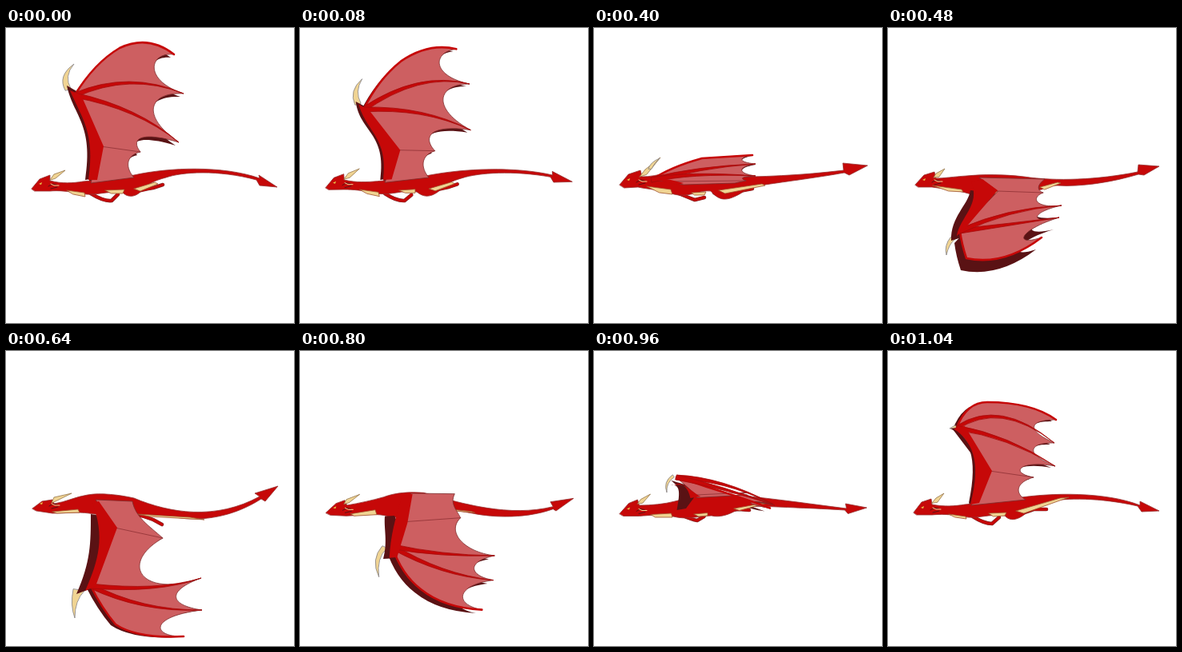
Animation of 360 by 369 pixels, one loop 1.12 s. Source, as an HTML page with a canvas:

```html
<!DOCTYPE html>
<html lang="en">
<head>
<meta charset="utf-8">
<title>Flying dragon</title>
<style>
html, body { margin: 0; width: 100%; height: 100%; overflow: hidden; background: #fff; }
canvas { display: block; width: 360px; height: 369px; }
</style>
</head>
<body>
<canvas id="stage" width="360" height="369"></canvas>
<script>
const LOOP = 1120;
const RED = '#c60808', SKIN = '#cd5f61', DARK = '#5a1214', LINE = '#7c2a2a', CREAM = '#f0d493', GREY = '#858084';

// Every pose uses the same path commands, so numbers can be blended one by one.
const poses = [
  {
    at: 0,
    body: 'M32 201 L42 189 L55 184 L55 191 C70 195 84 194 96 192 C118 190 142 187 160 184 C205 174 272 172 317 188 L316 184 L339 199 L317 197 L313 190 C265 177 220 180 200 187 C185 191 178 195 172 201 C162 213 152 212 146 206 C125 203 112 211 92 207 C78 204 65 203 55 204 L36 204Z',
    legs: 'M106 207 Q122 217 132 216 L140 208 M156 206 Q172 202 184 200 L196 196',
    belly: 'M76 203 L98 206 L99 211 L84 208Z M124 203 L148 202 L146 207 L132 207Z M160 201 L186 193 L190 195 L168 204Z',
    horn: 'M55 190 L60 183 L74 178 L62 188Z',
    claw: 'M74 78 Q64 60 85 45 Q72 60 81 76Z',
    dark: 'M76 72 C84 110 110 120 99 190 L112 188 L118 148 L90 80Z',
    arm: 'M80 78 C94 112 112 130 103 190 L114 190 L122 148 L94 84Z',
    wing: 'M86 84 Q110 44 142 25 Q178 8 210 33 C178 30 172 66 222 82 C178 80 168 110 216 143 C166 128 156 140 168 155 C148 160 150 176 160 187 L106 194 L118 148Z',
    bend: '155 54 165 100', back: '-4 4'
  },
  {
    at: 240,
    body: 'M32 197 L43 184 L54 180 L56 188 C70 191 84 190 98 191 C118 190 142 188 162 185 C205 179 262 175 313 176 L314 170 L343 179 L317 185 L313 179 C270 180 230 183 208 189 C198 192 194 196 190 199 C168 215 158 211 146 203 C130 200 118 209 96 206 C80 201 68 200 55 198 L36 199Z',
    legs: 'M106 207 Q118 216 128 216 L138 210 M160 208 Q176 200 186 198 L198 194',
    belly: 'M72 200 L98 204 L100 210 L84 206Z M124 203 L136 201 L140 205 L132 205Z M164 201 L196 192 L200 194 L172 203Z',
    horn: 'M55 187 L61 179 L75 172 L63 185Z',
    claw: 'M58 132 Q54 115 63 101 Q60 118 66 130Z',
    dark: 'M57 132 C56 170 106 154 103 190 L112 188 L128 163 L70 138Z',
    arm: 'M60 130 C60 166 108 150 106 190 L116 188 L132 162 L74 144Z',
    wing: 'M66 138 Q74 104 94 75 Q126 38 166 13 C140 30 148 48 192 46 C158 50 156 82 208 97 C150 104 148 132 170 151 C156 158 152 172 163 187 L106 192 L130 162Z',
    bend: '135 55 135 96', back: '-4 1'
  },
  {
    at: 400,
    body: 'M32 196 L43 183 L58 178 L60 186 C70 186 80 184 92 181 C118 180 142 182 162 186 C205 187 262 184 312 178 L311 169 L342 172 L319 184 L313 181 C280 187 240 192 214 196 C204 198 198 199 194 200 C168 218 158 218 146 204 C132 202 118 213 100 208 C84 202 68 202 55 199 L38 200Z',
    legs: 'M106 207 Q118 212 126 215 L138 212 M150 206 Q162 214 182 204 L198 201',
    belly: 'M66 198 L96 202 L98 208 L82 206Z M122 206 L140 205 L138 209 L126 209Z M156 203 L210 195 L214 197 L164 207Z',
    horn: 'M57 186 L64 177 L83 162 L66 183Z',
    claw: 'M68 176 Q70 168 82 163 Q76 168 72 176Z',
    dark: 'M72 188 C85 188 95 192 105 194 L112 192 L100 188 L80 186Z',
    arm: 'M70 189 C85 191 95 194 105 196 L112 194 L96 190 L74 187Z',
    wing: 'M72 190 Q95 174 135 163 Q165 161 198 159 C180 162 180 168 202 170 C178 174 180 182 202 185 C184 186 182 188 190 191 C186 192 180 193 176 194 L112 196 L92 192Z',
    bend: '130 174 120 180', back: '0 1'
  },
  {
    at: 480,
    body: 'M34 196 L45 184 L58 180 L60 188 C70 188 82 186 98 185 C120 183 145 183 170 186 C210 192 262 190 312 180 L313 171 L339 173 L320 184 L313 183 C280 193 240 199 212 197 C204 197 196 198 190 200 C168 208 158 212 146 206 C132 206 118 212 104 208 C84 202 68 201 55 199 L38 199Z',
    legs: 'M106 207 Q116 212 122 212 L132 212 M150 204 Q170 204 180 202 L192 200',
    belly: 'M56 197 L92 202 L94 205 L76 204Z M124 205 L140 204 L138 207 L130 207Z M190 199 L212 193 L216 194 L196 202Z',
    horn: 'M57 187 L60 182 L71 176 L64 186Z',
    claw: 'M78 262 Q70 272 73 284 Q76 270 84 264Z',
    dark: 'M79 266 C78 236 100 222 103 203 L112 204 L120 214 L92 262Z',
    arm: 'M86 260 C90 236 116 222 104 192 L118 189 L137 203 L96 251Z',
    wing: 'M90 254 Q92 270 98 288 Q145 298 192 262 C156 274 164 252 214 237 C176 246 178 230 217 222 C184 226 178 212 194 206 C188 204 184 198 196 189 L114 187 L137 204Z',
    bend: '150 246 150 226', back: '-7 15'
  },
  {
    at: 640,
    body: 'M33 197 L45 188 L58 186 L60 191 C74 189 88 182 102 180 C118 177 142 180 160 184 C205 203 262 212 317 182 L311 178 L340 169 L324 188 L319 185 C285 207 245 214 212 208 C200 207 190 206 180 205 C168 206 158 205 148 204 C134 204 118 206 104 203 C90 201 72 203 58 203 L38 200Z',
    legs: 'M116 203 Q122 206 126 208 L132 208 M160 204 Q172 206 184 211 L195 217',
    belly: 'M58 201 L90 198 L92 202 L64 203Z M124 203 L140 202 L138 205 L130 205Z M164 204 L230 208 L248 211 L180 207Z',
    horn: 'M57 190 L60 183 L82 178 L64 187Z',
    claw: 'M84 298 Q80 318 86 334 Q86 312 98 300Z',
    dark: 'M88 304 C106 264 106 240 106 204 L118 206 L122 240 L104 298Z',
    arm: 'M99 300 C116 262 124 232 108 190 L116 188 L139 221 L112 294Z',
    wing: 'M106 294 Q120 322 137 342 Q164 360 222 357 C182 358 178 332 245 324 C204 318 200 300 244 284 C170 310 140 266 196 234 C178 218 162 208 158 188 L112 186 L136 221Z',
    bend: '170 326 190 302', back: '-6 1'
  },
  {
    at: 880,
    body: 'M32 205 L45 192 L55 187 L58 194 C74 191 92 189 106 184 C120 177 135 174 152 174 C205 186 262 206 316 201 L314 194 L343 192 L318 206 L315 204 C285 210 245 207 215 200 C206 198 196 196 188 194 C175 198 160 204 148 206 C136 210 120 212 106 207 C92 204 74 207 58 208 L38 208Z',
    legs: 'M116 205 Q124 206 128 208 L136 206 M160 195 Q172 196 180 198 L190 200',
    belly: 'M66 205 L96 199 L98 206 L70 208Z M124 205 L136 203 L138 206 L130 207Z M190 194 L206 197 L204 198 L194 196Z',
    horn: 'M54 192 L57 187 L71 180 L60 191Z',
    claw: 'M112 217 Q92 232 105 257 Q100 232 114 220Z',
    dark: 'M112 238 C112 225 104 214 106 208 L118 206 L128 214 L126 240Z',
    arm: 'M118 238 C112 214 116 200 138 176 L153 174 L132 212 L126 240Z',
    wing: 'M120 220 Q130 258 158 276 Q188 302 230 307 C195 296 206 272 240 268 C212 262 214 244 243 242 C222 222 204 206 203 196 C204 188 200 182 211 174 L152 174 L128 210Z',
    bend: '180 258 170 234', back: '-8 6'
  },
  {
    at: 1040,
    body: 'M32 202 L42 189 L54 185 L55 192 C70 195 84 194 96 192 C118 190 142 186 160 184 C205 177 272 176 315 193 L315 188 L339 200 L317 201 L312 194 C265 183 220 184 204 188 C190 191 182 195 176 200 C162 213 152 213 146 206 C126 203 112 211 92 207 C78 204 65 204 55 205 L36 205Z',
    legs: 'M106 207 Q120 216 130 216 L139 208 M156 206 Q172 202 182 198 L198 198',
    belly: 'M76 204 L97 207 L98 210 L84 208Z M126 203 L148 202 L146 206 L132 207Z M160 200 L215 184 L226 183 L170 203Z',
    horn: 'M55 190 L60 184 L70 178 L62 189Z',
    claw: 'M84 93 Q80 95 77 97 Q80 97 86 96Z',
    dark: 'M78 97 C100 108 114 130 101 190 L112 188 L124 150 L90 96Z',
    arm: 'M82 97 C104 112 118 136 103 192 L114 190 L130 150 L96 94Z',
    wing: 'M86 96 Q98 64 124 64 Q180 64 210 86 C178 86 170 98 208 115 C178 114 168 128 209 144 C166 136 150 152 182 158 C160 164 158 178 172 186 L104 193 L127 150Z',
    bend: '140 60 150 106', back: '-5 2'
  }
];

const ctx = document.getElementById('stage').getContext('2d');
ctx.lineJoin = ctx.lineCap = 'round';

const NUMBER = /-?\d+(\.\d+)?/g;
const numbers = text => text.match(NUMBER).map(Number);

function blend(a, b, k) {
  const ends = numbers(b);
  let i = 0;
  return a.replace(NUMBER, n => (+n + (ends[i++] - n) * k).toFixed(2));
}

function poseAt(time) {
  const i = poses.findLastIndex(p => p.at <= time);
  const from = poses[i], to = poses[(i + 1) % poses.length];
  const k = (time - from.at) / ((to.at || LOOP) - from.at);
  const pose = {};
  for (const part in from) if (part !== 'at') pose[part] = blend(from[part], to[part], k);
  return pose;
}

function fill(d, color, edge) {
  ctx.fillStyle = color;
  ctx.fill(new Path2D(d));
  if (edge) stroke(d, edge, 0.8);
}

function stroke(d, color, width) {
  ctx.strokeStyle = color;
  ctx.lineWidth = width;
  ctx.stroke(new Path2D(d));
}

// Curved bone that narrows to a point.
function bone(x, y, cx, cy, tx, ty, width) {
  const len = Math.hypot(tx - x, ty - y) || 1;
  const nx = (y - ty) / len * width / 2, ny = (tx - x) / len * width / 2;
  fill(`M${x + nx} ${y + ny} Q${cx + nx / 2} ${cy + ny / 2} ${tx} ${ty} Q${cx - nx / 2} ${cy - ny / 2} ${x - nx} ${y - ny}Z`, RED, '#a50c0c');
}

function drawBody(p) {
  stroke(p.legs, LINE, 4.6);
  stroke(p.legs, RED, 3.4);
  fill(p.body, RED, '#963030');
  fill(p.belly, CREAM, '#a0522d');
  fill(p.horn, CREAM, '#95744a');
  const [x, y] = numbers(p.body);
  fill(`M${x + 9} ${y - 6} l4 -2 l-1 3Z`, '#e8c64a');
  stroke(`M${x + 21} ${y - 3} l5 -3 l5 1 M${x + 24} ${y} l8 -2`, DARK, 1);
  stroke(`M${x + 24} ${y - 6} l4 2 l6 0`, CREAM, 1);
}

function drawWing(p) {
  const w = numbers(p.wing), [ax, ay, bx, by] = numbers(p.bend);
  fill(p.claw, CREAM, GREY);
  fill(p.dark, DARK);
  fill(p.wing, SKIN, LINE);
  stroke(`M${w[36]} ${w[37]} L${w[26]} ${w[27]}`, '#8e3034', 0.8);
  stroke(p.wing.split('C')[0], RED, 2.6);
  bone(w[0], w[1], ax, ay, w[14], w[15], 6);
  bone(w[0], w[1], bx, by, w[20], w[21], 6);
  fill(p.arm, RED);
}

function draw(time) {
  const p = poseAt(time);
  ctx.clearRect(0, 0, 360, 369);
  ctx.save();
  ctx.translate(...numbers(p.back));
  fill(p.wing, DARK);
  ctx.restore();
  drawBody(p);
  drawWing(p);
}

const start = performance.now();
function tick() {
  const t = (performance.now() - start) % LOOP;
  const step = t < 80 ? 40 : 80;
  draw(Math.floor(t / step) * step);
  requestAnimationFrame(tick);
}
tick();
</script>
</body>
</html>
```
